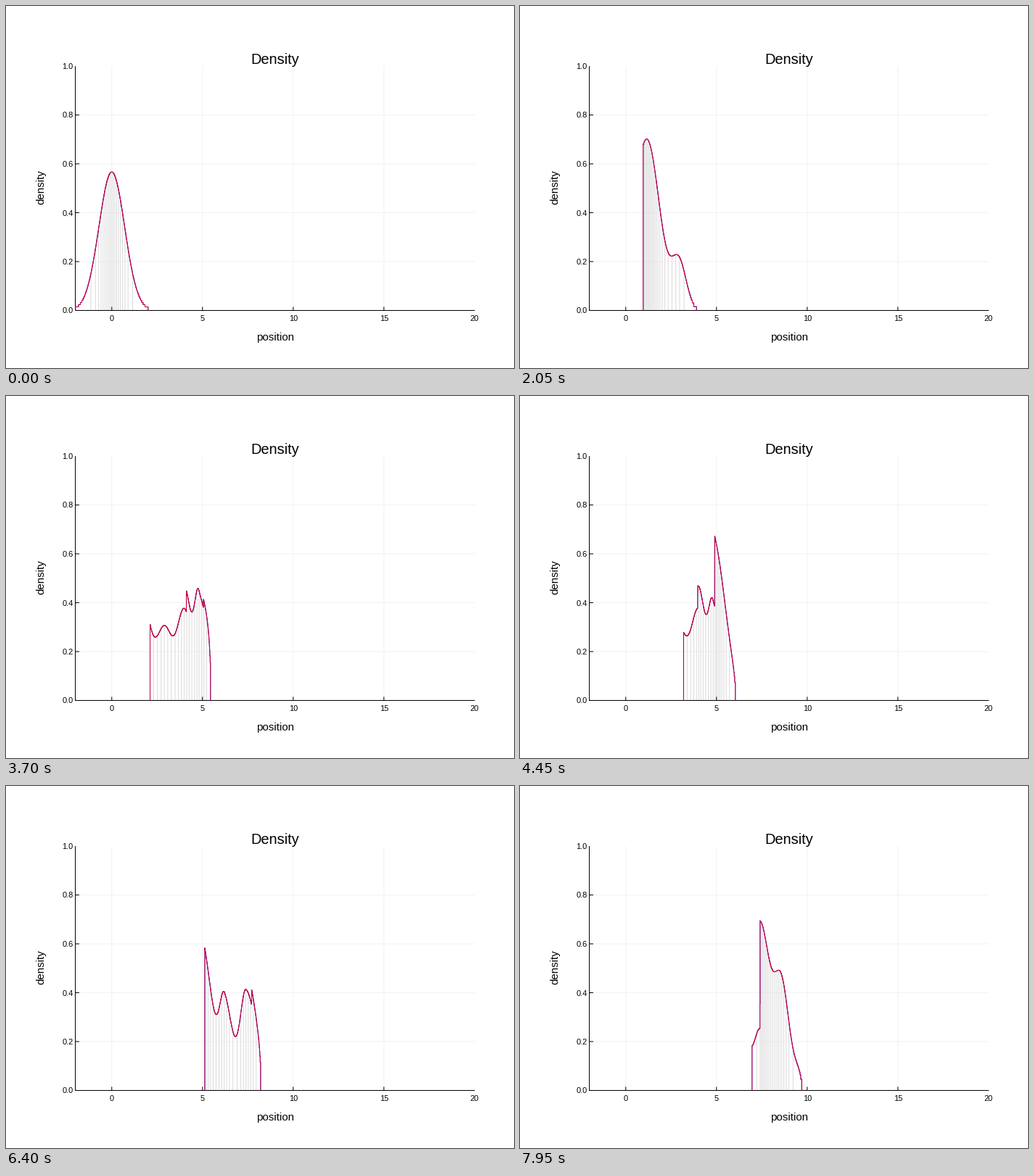
A matplotlib script that plays this animation: 700 px wide and 500 px high, repeating every 8000 ms.

```python
import numpy as np
import matplotlib.pyplot as plt
from matplotlib.animation import FuncAnimation

plt.rcParams["font.family"] = "Liberation Sans"
PX = 0.72            # one pixel in points at 100 dpi
FRAMES, STEP = 160, 50
CELLS, GROUPS = 400, 20

# Moments at which the rear and the front of the crowd change speed.
REAR = np.array([(0, -2), (1.75, .8), (3.4, 1.68), (5.1, 4.12),
                 (5.7, 4.72), (6.8, 5.36), (7.65, 6.36), (7.95, 6.96)]).T
FRONT = np.array([(0, 2), (.85, 2.6), (1.7, 3.56), (3.4, 5.2), (4.45, 6.04),
                  (5.7, 7.72), (6.8, 8.48), (7.65, 9.2), (7.95, 9.7)]).T

# Bottlenecks: place, height, start, full, rear width, front width, shock.
HILLS = [
    (2.93, .265, 1.0, 2.6, .57, .57, 0),
    (4.00, .46, 2.0, 3.5, .58, .55, .2),
    (4.80, .65, 2.9, 4.2, .33, .95, .45),
    (6.22, .33, 4.5, 6.1, .38, .64, 0),
    (7.40, .68, 5.0, 7.2, .45, .80, .65),
    (8.60, .40, 6.0, 8.0, .55, .60, 0),
    (9.55, .06, 7.3, 7.9, .40, .40, 0),
]


def to_x(x):
    return 95.75 + 25 * (np.asarray(x) + 2)


def to_y(d):
    return 420.5 - 337.5 * np.asarray(d)


def smooth(u):
    u = np.clip(u, 0, 1)
    return u * u * (3 - 2 * u)


def bell(x, center, width):
    return np.exp(-((x - center) / width) ** 2)


def crowd(x, t):
    """The starting bell: it drifts to the first bottleneck and steepens behind."""
    e = min(t / 1.2, 1)
    center = 1.15 * e
    y = np.where(x > center - .19 * e, bell(x, center, 1), bell(x, center, 1 + e ** 3))
    for gap, drop in ((.19, .38), (.66, .45)):
        y = np.where(x < center - gap, y * (1 - drop * e ** 3), y)
    return (.567 + .135 * smooth(t / 1.8)) * y


def hill(x, t, place, height, start, full, rear, front, shock):
    """A queue at a bottleneck; its shock forms late and creeps backwards."""
    grow = smooth((t - start) / (full - start))
    if not shock:
        return height * grow * bell(x, place, np.where(x < place, rear, front))
    jump = place + .15 - .2 * (t - full)
    behind = np.where(x < place, bell(x, place, rear), bell(x, place, front))
    ahead = np.where(x < place, bell(x, place, front), behind)
    mix = grow ** 4
    queue = np.where(x < jump, (1 - shock * mix) * behind,
                     mix * ahead + (1 - mix) * behind)
    return height * grow * queue


def cells(t):
    """Cell borders and cell densities at time t in seconds."""
    rear, front = np.interp(t, *REAR), np.interp(t, *FRONT)
    x = np.linspace(rear, front, 2500)
    rho = crowd(x, t) + sum(hill(x, t, *h) for h in HILLS)
    rho *= 1 - .5 * min(t, 1) * np.exp((x - front) / .08)
    rho = np.maximum(rho, .01)
    steps = (rho[1:] + rho[:-1]) / 2 * np.diff(x)
    cum = np.concatenate([[0], np.cumsum(steps)])
    borders = np.interp(np.linspace(0, cum[-1], CELLS + 1), cum, x)
    return borders, cum[-1] / CELLS / np.diff(borders)


fig = plt.figure(figsize=(7, 5), dpi=100, facecolor="white")
ax = fig.add_axes([0, 0, 1, 1])
ax.set_xlim(0, 700)
ax.set_ylim(500, 0)
ax.axis("off")


def line(xs, ys, color, z, **kw):
    return ax.plot(xs, ys, color=color, lw=PX, zorder=z, snap=False,
                   solid_capstyle="butt", **kw)[0]


def label(x, y, s, size, ha="center", va="baseline", **kw):
    ax.text(x, y, s, fontsize=size * PX, ha=ha, va=va, color="black", **kw)


for v in range(0, 21, 5):
    px = float(to_x(v))
    if v < 20:
        line([px, px], [83, 420], "#f2f2f2", 1)
        line([px, px], [420.5, 415.5], "black", 4)
    label(px + .25, 435, str(v), 11)
for k in range(6):
    py = float(to_y(k / 5))
    if 0 < k < 5:
        line([96, 646], [py, py], "#f2f2f2", 1)
        line([95.5, 101], [py, py], "black", 4)
    label(92.5, py + 4, f"{k / 5:.1f}", 11, ha="right")
line([95.5, 95.5], [83, 421], "black", 4)
line([95, 646], [420.5, 420.5], "black", 4)
label(370.5, 80, "Density", 20)
label(371, 462, "position", 15)
label(48, 250.5, "density", 15, va="center", rotation=90)

bars = line([], [], "#dadada", 2)
under = line([], [], "#0000ff", 5)
over = line([], [], "#ff0000", 6, alpha=0.8)


def draw(n):
    borders, dens = cells(n * STEP / 1000)
    px = to_x(np.repeat(borders, 2))
    py = to_y(np.concatenate([[0], np.repeat(dens, 2), [0]]))
    for curve in (under, over):
        curve.set_data(px, py)

    pick = np.arange(1, GROUPS) * CELLS // GROUPS
    gap = np.full(len(pick), np.nan)
    bx = to_x(borders[pick])
    foot = np.full(len(pick), 420.0)
    bars.set_data(np.column_stack([bx, bx, gap]).ravel(),
                  np.column_stack([foot, to_y(dens[pick]), gap]).ravel())
    return bars, under, over


anim = FuncAnimation(fig, draw, frames=FRAMES, interval=STEP, repeat=True, repeat_delay=0)
plt.show()
```
